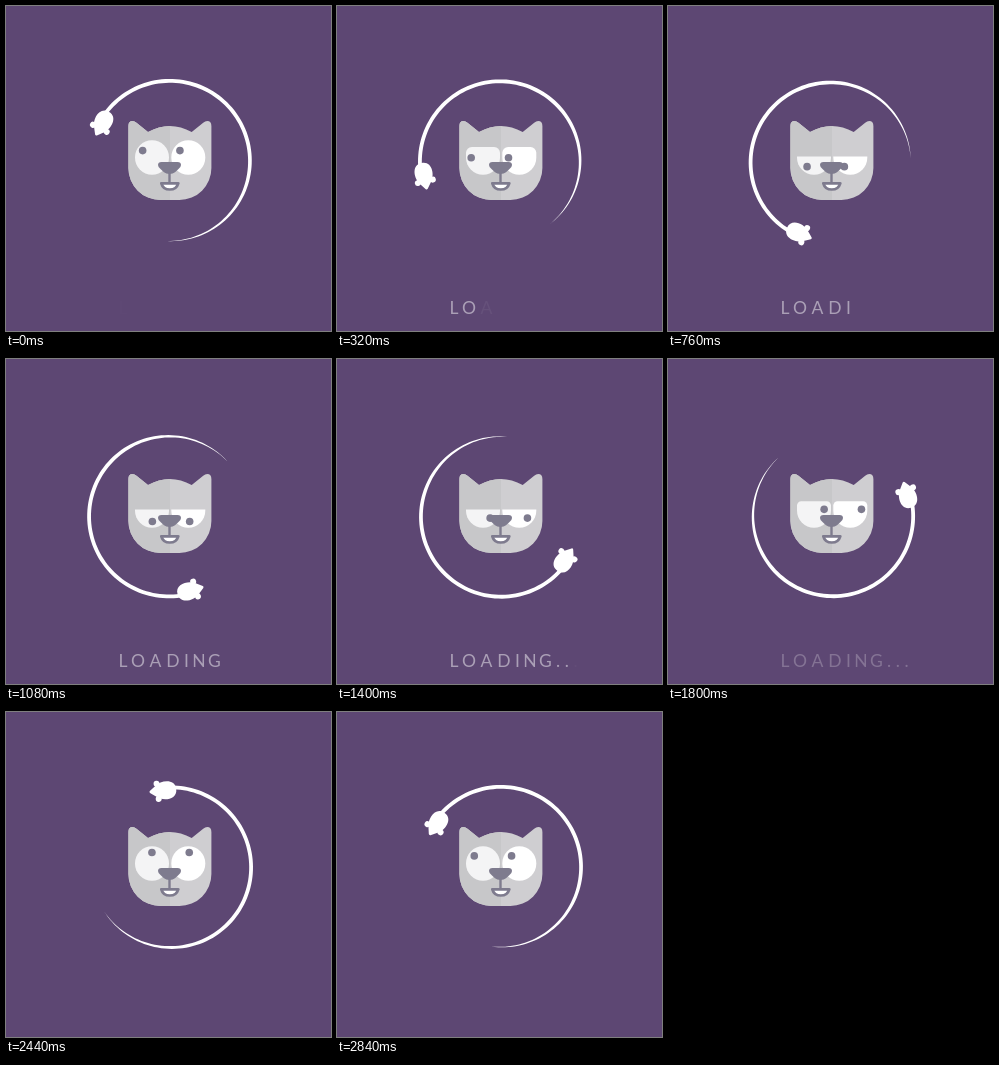
These frames come from a looping animation (325x325 px, 2.88 s). An HTML page:

```html
<!DOCTYPE html>
<html lang="en">
<head>
<meta charset="utf-8">
<title>Loading</title>
<style>
  html, body { margin: 0; width: 100%; height: 100%; overflow: hidden; background: #5d4773; }
  svg { display: block; width: 100vw; height: 100vh; }
  text { font: 400 17.5px Lato, sans-serif; text-anchor: middle; fill: #fff; }
</style>
</head>
<body>
<svg viewBox="0 0 325 325">
  <defs>
    <path id="head" d="M122.400 120Q122.400 115 126.500 115Q128.500 115 130.500 116.800L142 126Q164 114 185.700 126L197.200 116.800Q199.200 115 201.200 115Q205.400 115 205.400 120V162A32 32 0 0 1 173.400 194H154.400A32 32 0 0 1 122.400 162Z"/>
    <clipPath id="headClip"><use href="#head"/></clipPath>
  </defs>

  <g id="mouse" fill="#fff">
    <path id="tail"/>
    <g transform="translate(158 78.500) rotate(-6)">
      <path d="M12.500 0C12.500-11-2-10.500-8-5.500L-14-1Q-15 0-14 1L-8 5.500C-2 10.500 12.500 11 12.500 0Z"/>
      <circle cx="-6.500" cy="-7.600" r="3"/>
      <circle cx="-6" cy="7.800" r="3"/>
    </g>
  </g>

  <use href="#head" fill="#cfced1"/>
  <rect x="122" y="110" width="42" height="90" fill="#c7c7c9" clip-path="url(#headClip)"/>

  <path id="leftEye" fill="#f4f4f5"/>
  <path id="rightEye" fill="#fff"/>
  <g id="pupils" fill="#7e7b8e">
    <circle r="3.800"/>
    <circle cx="37.300" r="3.800"/>
  </g>

  <path d="M155.500 156H171.500Q175 156 175 159Q175 161 172.500 163L169 166.200Q167 168 163.500 168Q160 168 158 166.200L154.500 163Q152 161 152 159Q152 156 155.500 156Z" fill="#7e7b8e"/>
  <path d="M163.500 166V177" stroke="#7e7b8e" stroke-width="2.400"/>
  <path d="M155.300 177.300H172.300Q170.500 183.500 163.800 183.500Q157 183.500 155.300 177.300Z" fill="#fff" stroke="#7e7b8e" stroke-width="2.700" stroke-linejoin="round"/>

  <g id="label"></g>
</svg>
<script>
const LOOP = 2880, QUARTER = LOOP / 4, RAD = Math.PI / 180;
const $ = id => document.getElementById(id);
const clamp = v => Math.max(0, Math.min(1, v));
const ease = v => (1 - Math.cos(Math.PI * clamp(v))) / 2;

// Ring-shaped tail, tapering to a point at its far end
function tailPath(cx, cy, r, from, to) {
  const outer = [], inner = [];
  for (let a = from; a <= to; a += 2.5) {
    const half = 1.9 * Math.sin(Math.PI / 2 * clamp((to - a) / 110));
    const at = d => [cx + d * Math.cos(a * RAD), cy + d * Math.sin(a * RAD)].map(v => v.toFixed(2)).join(' ');
    outer.push(at(r + half));
    inner.unshift(at(r - half));
  }
  return 'M' + outer.concat(inner).join('L') + 'Z';
}
$('tail').setAttribute('d', tailPath(165, 155.4, 80.1, -88, 147));

// Round bowl whose top drops and squares off as the lid closes
function eyePath(x, shut) {
  const r = 17, top = 134.2 + 16.3 * shut, c = r * (1 - shut) ** 2;
  return `M${x} 151.700V${top + c}A${c} ${c} 0 0 1 ${x + c} ${top}H${x + 2 * r - c}`
    + `A${c} ${c} 0 0 1 ${x + 2 * r} ${top + c}V151.700A${r} ${r} 0 0 1 ${x} 151.700Z`;
}

const centers = [117, 132, 149.5, 167, 180.5, 193, 208.5, 221, 229.8, 238.6];
const letters = [...'LOADING...'].map((ch, i) => {
  const el = document.createElementNS('http://www.w3.org/2000/svg', 'text');
  el.textContent = ch;
  el.setAttribute('x', centers[i]);
  el.setAttribute('y', 307.6);
  $('label').appendChild(el);
  return el;
});

function draw(t) {
  const turn = 360 * t / LOOP;
  $('mouse').setAttribute('transform', `rotate(${305 - turn} 164 156.3)`);

  const look = (219 - turn) * RAD;
  $('pupils').setAttribute('transform',
    `translate(${145.2 + 11 * Math.cos(look)} ${151.5 + 11 * Math.sin(look)})`);

  const shut = ease(t / QUARTER) - ease((t - 2 * QUARTER) / QUARTER);
  $('leftEye').setAttribute('d', eyePath(129, shut));
  $('rightEye').setAttribute('d', eyePath(165.3, shut));

  const fade = 0.48 * (1 - clamp((t - 2 * QUARTER) / QUARTER));
  letters.forEach((el, i) => el.setAttribute('opacity', fade * clamp((t - 155 * i) / 100)));
}

function tick() {
  draw(performance.now() % LOOP);
  requestAnimationFrame(tick);
}
tick();
</script>
</body>
</html>
```
